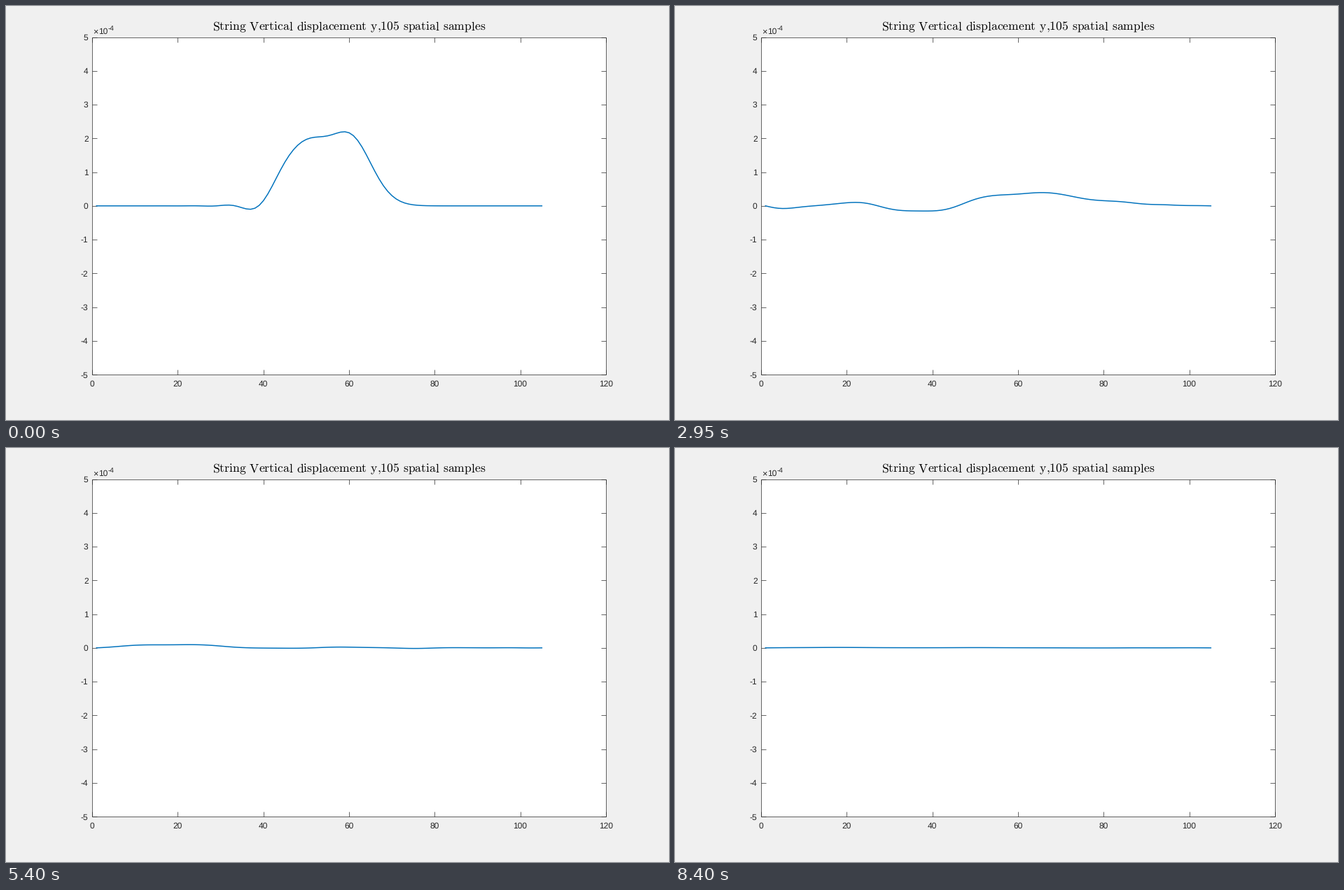
Recreate the animation shown at these times as a matplotlib script. Size 947 by 592 pixels, loop 8.45 s.

```python
import numpy as np
import matplotlib.pyplot as plt
from matplotlib.animation import FuncAnimation

plt.rcParams["font.family"] = "Liberation Sans"
plt.rcParams["mathtext.fontset"] = "cm"
plt.rcParams["text.hinting"] = "none"

# Stage, in pixels
W, H, DPI = 947, 592, 64
PT = 72 / DPI
LEFT, RIGHT, TOP, BOTTOM = 123.1, 857.1, 44.5, 527.1
INK, BLUE = "#262626", "#0072BD"

# Timing
TICK_MS, HOLD, SHAPES = 50, 10, 160

# Struck string: leapfrog scheme with air loss and a resistive bridge
N, FS, F1, LENGTH, MASS = 105, 16000, 65.4, 1.92, 0.035
LOSS, BRIDGE = 0.5, 1000
STEPS = 800
PEAK = 2.196e-4

# Hammer
H_MASS, H_SPEED, H_STIFF, H_POWER, H_NODE = 4.9e-3, 2.5, 4e8, 2.3, 11


def string_matrices():
    """Return A, B of the update y_next = A y + B y_prev."""
    courant = 2 * F1 * N / FS
    c2 = courant ** 2
    loss = LOSS / FS
    wall = BRIDGE * courant
    A = (2 - 2 * c2) * np.eye(N) + c2 * (np.eye(N, k=1) + np.eye(N, k=-1))
    A[-1, -2] = 2 * c2
    A /= 1 + loss
    A[-1] *= (1 + loss) / (1 + loss + wall)
    b = np.full(N, (loss - 1) / (1 + loss))
    b[-1] = (loss - 1 + wall) / (1 + loss + wall)
    A[0], b[0] = 0, 0
    return A, np.diag(b)


def strike(A, B):
    """Run the hammer contact up to sample number STEPS, the rest being first."""
    dt = 1 / FS
    push = np.zeros(N)
    push[H_NODE - 5:H_NODE + 6] = np.hanning(11)
    push *= dt ** 2 * LENGTH / MASS
    y, y_prev = np.zeros(N), np.zeros(N)
    ham, ham_prev = 0.0, -H_SPEED * dt
    for _ in range(STEPS - 1):
        force = H_STIFF * max(0.0, ham - y[H_NODE]) ** H_POWER
        y, y_prev = A @ y + B @ y_prev + push * force, y
        ham, ham_prev = 2 * ham - ham_prev - dt ** 2 * force / H_MASS, ham
    return np.concatenate([y, y_prev])


def string_shapes():
    A, B = string_matrices()
    step = np.block([[A, B], [np.eye(N), np.zeros((N, N))]])
    jump = np.linalg.matrix_power(step, STEPS)
    state = strike(A, B)
    shapes = []
    for _ in range(SHAPES):
        shapes.append(state[:N])
        state = jump @ state
    return np.array(shapes) * PEAK / shapes[0].max()


def px(x):
    return LEFT + (RIGHT - LEFT) * x / 120


def py(y):
    return (TOP + BOTTOM) / 2 - (BOTTOM - TOP) * y / 1e-3


fig = plt.figure(figsize=(W / DPI, H / DPI), dpi=DPI, facecolor="#f0f0f0")
ax = fig.add_axes([0, 0, 1, 1])
ax.set_xlim(0, W)
ax.set_ylim(H, 0)
ax.axis("off")


def label(x, y, text, size=12, ha="center"):
    ax.text(x, y, text, fontsize=size * PT, color=INK, ha=ha, va="baseline")


def rule(xs, ys):
    ax.plot(xs, ys, color=INK, lw=0.7 * PT, solid_capstyle="butt", zorder=2)


# Plot box with inward ticks on all sides
ax.fill([LEFT, RIGHT, RIGHT, LEFT], [TOP, TOP, BOTTOM, BOTTOM],
        color="white", lw=0, zorder=1)
for x in (LEFT, RIGHT):
    rule([x, x], [TOP, BOTTOM])
for y in (TOP, BOTTOM):
    rule([LEFT, RIGHT], [y, y])

TICK = 7.3
for v in range(0, 121, 20):
    x = px(v)
    rule([x, x], [BOTTOM, BOTTOM - TICK])
    rule([x, x], [TOP, TOP + TICK])
    label(x - 0.2, 543.8, str(v))
for v in range(-5, 6):
    y = py(v * 1e-4)
    rule([LEFT, LEFT + TICK], [y, y])
    rule([RIGHT, RIGHT - TICK], [y, y])
    label(117.6, y + 4.3, str(v), ha="right")

label(123.8, 40.3, "×", size=12.8, ha="left")
label(131.8, 40.3, "10", ha="left")
label(145.8, 34.6, "-4", size=10, ha="left")

words = "String Vertical displacement y{,}105 spatial samples".split()
title = r"$\mathrm{" + r"\,\:".join(words) + "}$"
ax.text(490.3, 35.8, title, fontsize=17.6 * PT, color="black",
        ha="center", va="baseline")

shapes = string_shapes()
xs = px(np.arange(1, N + 1))
curve, = ax.plot(xs, py(shapes[0]), color=BLUE, lw=1.5 * PT, zorder=3,
                 solid_joinstyle="round", solid_capstyle="projecting")


def draw(i):
    curve.set_ydata(py(shapes[max(0, i - HOLD + 1)]))
    return curve,


anim = FuncAnimation(fig, draw, frames=HOLD + SHAPES - 1, interval=TICK_MS,
                     repeat=True, repeat_delay=0, blit=False)
plt.show()
```
